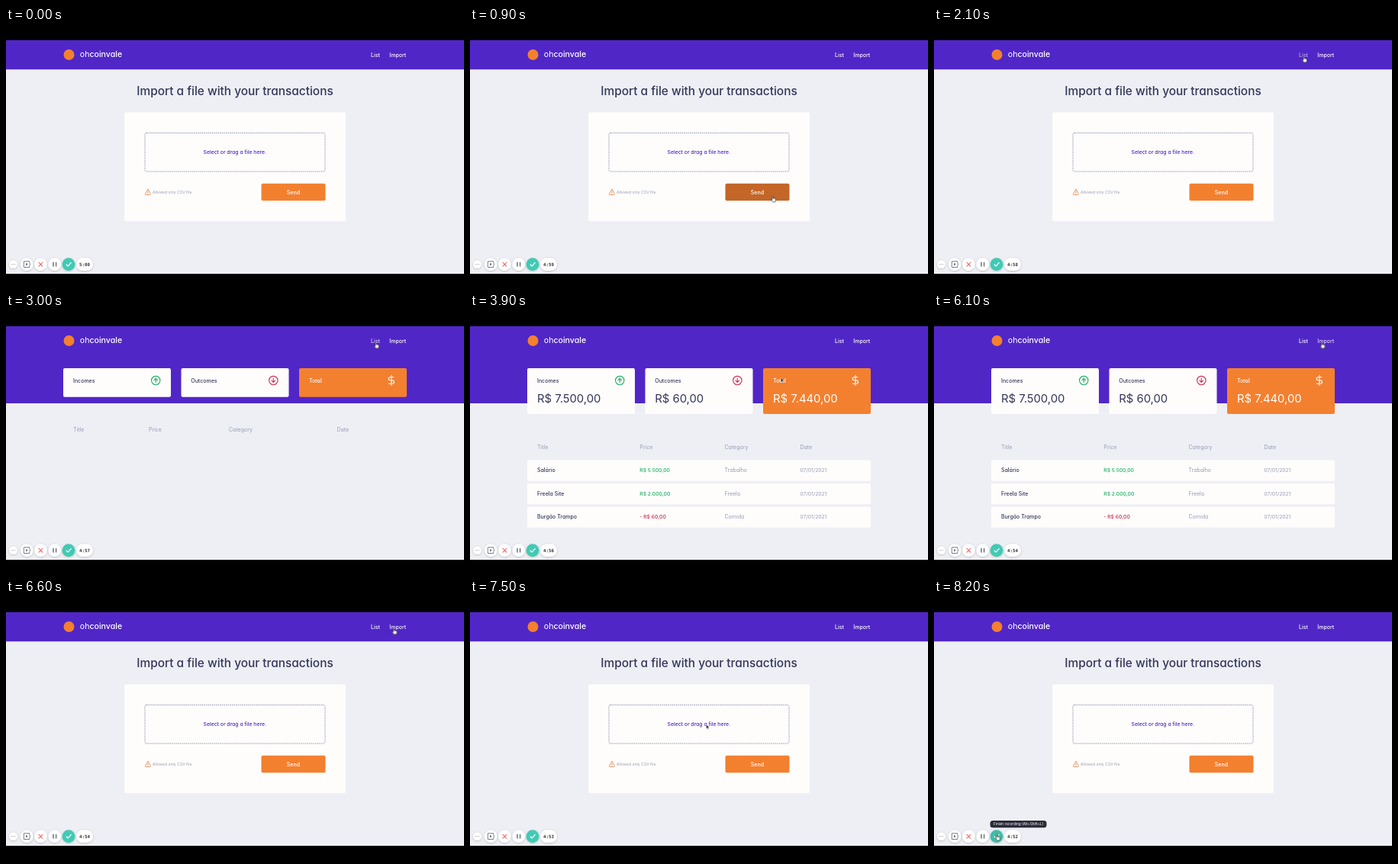
Animation of 600 by 338 pixels, one loop 8.4 s. Source, as an HTML page:

```html
<!DOCTYPE html>
<html lang="en">
<head>
<meta charset="utf-8">
<title>Import transactions</title>
<style>
html, body { margin: 0; width: 100%; height: 100%; overflow: hidden; background: #000; }
svg { display: block; width: 100vw; height: 100vh; }
text {
  font: 500 7px Inter, "Open Sans", sans-serif;
  font-feature-settings: "cv11";
  fill: #33365a;
  white-space: pre;
}
.mid { text-anchor: middle; }
.light { fill: #fff; }
.muted, .muted text { fill: #969cb3; font-weight: 400; }
.price { font-size: 6.75px; }
.date { font-size: 6.7px; }
.gain { fill: #1fb566; }
.loss { fill: #d0304f; }
.amount { font-size: 14.8px; font-weight: 400; }
.line { fill: none; stroke-linecap: round; stroke-linejoin: round; }
.card { fill: #fffdfc; }
.accent { fill: #f3802f; }

/* one shared 8.4 s loop */
.a { animation: 8.4s linear infinite; }
.step { animation-timing-function: step-end; }
#form { animation-name: form; }
#list { animation-name: list; }
#empty { animation-name: empty; }
#full { animation-name: full; }
#send { animation-name: send; }
#navList { animation-name: nav-list; }
#navImport { animation-name: nav-import; }
#done { animation-name: done; }
#tip { animation-name: tip; }
#cursor { animation-name: move; animation-timing-function: ease-in-out; }
#arrow { animation-name: arrow; }
#hand { animation-name: hand; }

@keyframes form { 0%, 78.3% { opacity: 1 } 34.3% { opacity: 0 } 100% { opacity: 1 } }
@keyframes list { 0%, 78.3% { opacity: 0 } 34.3% { opacity: 1 } 100% { opacity: 0 } }
@keyframes empty { 0% { opacity: 1 } 39.3%, 100% { opacity: 0 } }
@keyframes full { 0% { opacity: 0 } 39.3%, 100% { opacity: 1 } }
@keyframes send {
  0%, 8.2%, 17.5%, 100% { fill: #f3802f }
  10.2%, 15.2% { fill: #c36628 }
}
@keyframes nav-list {
  0%, 22.6%, 34.3%, 44%, 100% { opacity: 1 }
  25%, 34.25%, 37%, 42% { opacity: .6 }
}
@keyframes nav-import {
  0%, 71.5%, 78.3%, 85.5%, 100% { opacity: 1 }
  73.5%, 78.25%, 80.5%, 83.5% { opacity: .6 }
}
@keyframes done { 0% { fill: #3fcab4 } 95.1%, 100% { fill: #42bba8 } }
@keyframes tip { 0% { opacity: 0 } 95.1%, 100% { opacity: 1 } }
@keyframes move {
  0%, 4.5% { transform: translate(430px, 318px) }
  9.5%, 14.9% { transform: translate(396px, 220.5px) }
  23.2%, 41.7% { transform: translate(484px, 37.5px) }
  51.2%, 54.5% { transform: translate(330px, 130px) }
  62.5%, 64.9% { transform: translate(287px, 161.5px) }
  72%, 83.3% { transform: translate(507.5px, 37.5px) }
  95.8%, 100% { transform: translate(82px, 307.5px) }
}
@keyframes arrow {
  0%, 8.2%, 22.6%, 43.5%, 71.2%, 85%, 95.1%, 100% { opacity: 0 }
  4.5%, 16%, 43.6%, 85.1% { opacity: 1 }
}
@keyframes hand {
  0%, 16%, 43.6%, 85.1% { opacity: 0 }
  8.2%, 22.6%, 71.2%, 95.1%, 100% { opacity: 1 }
}
</style>
</head>
<body>
<svg viewBox="0 0 600 338" preserveAspectRatio="none">
  <defs>
    <filter id="soft" x="-30%" y="-30%" width="160%" height="170%">
      <feDropShadow dx="0" dy=".6" stdDeviation="1.1" flood-opacity=".28"/>
    </filter>
  </defs>

  <rect width="600" height="338"/>
  <rect y="16" width="600" height="306" fill="#eeeff4"/>
  <rect y="16" width="600" height="38.3" fill="#5126c7"/>

  <g id="form" class="a step">
    <text class="mid" x="300" y="87.6" style="font-size:15.4px">Import a file with your transactions</text>
    <rect class="card" x="155" y="110.5" width="290" height="142.5" rx="2"/>
    <rect x="182" y="137.5" width="236" height="50.5" rx="2" fill="none" stroke="#8b91ac" stroke-width=".9" stroke-dasharray="1.6 1"/>
    <text class="mid" x="299.8" y="165.1" style="font-size:6.85px;fill:#5126c7">Select or drag a file here.</text>
    <path class="line" d="M185.9 211.3 182.3 217.4Q182 218.5 183 218.5H188.6Q189.7 218.5 189.3 217.4ZM185.8 213.8V215.8M185.8 217V217.1" stroke="#e8834a" stroke-width=".8"/>
    <text class="muted" x="192" y="217" style="font-size:5.1px">Allowed only CSV file</text>
    <rect id="send" class="a accent" x="334.5" y="203.7" width="84" height="22.6" rx="2"/>
    <text class="mid light" x="376.4" y="217.5">Send</text>
  </g>

  <g id="list" class="a step">
    <rect y="54" width="600" height="63" fill="#5126c7"/>
    <g id="empty" class="a step">
      <g id="shortCards"></g>
      <g class="muted">
        <text x="88" y="154.4">Title</text>
        <text x="187" y="154.4">Price</text>
        <text x="292" y="154.4">Category</text>
        <text x="433.5" y="154.4">Date</text>
      </g>
    </g>
    <g id="full" class="a step">
      <g id="tallCards"></g>
      <g class="muted">
        <text x="88" y="176.9">Title</text>
        <text x="222.3" y="176.9">Price</text>
        <text x="333.5" y="176.9">Category</text>
        <text x="432.5" y="176.9">Date</text>
      </g>
      <text class="amount" x="88" y="116">R$ 7.500,00</text>
      <text class="amount" x="242.3" y="116">R$ 60,00</text>
      <text class="amount light" x="397" y="116">R$ 7.440,00</text>
      <g id="rows"></g>
    </g>
    <text x="88" y="89.5">Incomes</text>
    <text x="242.3" y="89.5">Outcomes</text>
    <text class="light" x="397" y="89.5">Total</text>
    <g class="line" stroke-width="1.15">
      <g stroke="#1fb566">
        <circle cx="196.2" cy="87" r="5.7"/>
        <path d="M196.2 89.5V84.5M193.9 86.8 196.2 84.5 198.5 86.8"/>
      </g>
      <g stroke="#dc2f55">
        <circle cx="350.3" cy="87" r="5.7"/>
        <path d="M350.3 84.5V89.5M348 87.2 350.3 89.5 352.6 87.2"/>
      </g>
      <path transform="translate(497.7 79.8) scale(.6)" stroke="#fff" stroke-width="1.8" d="M12 1v22M17 5H9.5a3.5 3.5 0 0 0 0 7h5a3.5 3.5 0 0 1 0 7H6"/>
    </g>
  </g>

  <circle cx="82.5" cy="35" r="7" class="accent"/>
  <text class="light" x="96.8" y="38" style="font-size:10.6px"><tspan font-weight="400" style="font-weight:400">oh</tspan>coinvale</text>
  <text id="navList" class="a light" x="478" y="37.7">List</text>
  <text id="navImport" class="a light" x="502.3" y="37.7">Import</text>

  <g filter="url(#soft)" fill="#fff">
    <circle cx="9.5" cy="309.6" r="5.4"/>
    <circle cx="27.2" cy="309.6" r="8.4"/>
    <circle cx="45.4" cy="309.6" r="8.4"/>
    <circle cx="63.8" cy="309.6" r="8.4"/>
    <circle id="done" class="a step" cx="82" cy="309.6" r="8.4" fill="#3fcab4"/>
    <rect x="92" y="301.2" width="22" height="16.8" rx="8.4"/>
  </g>
  <g class="line">
    <path d="M7.5 309.6h.01M9.5 309.6h.01M11.5 309.6h.01" stroke="#888" stroke-width="1"/>
    <path d="M30.8 307.5V305.7H23.4V313.5H30.8V311.7M31.3 308.5V310.7" stroke="#6f7380" stroke-width=".9"/>
    <path d="M26 307.8V311.4L28.8 309.6Z" fill="#6f7380"/>
    <path d="M42.9 307.1 47.9 312.1M47.9 307.1 42.9 312.1" stroke="#ec6a6a" stroke-width="1.1"/>
    <path d="M62 306.8V312.4M65.6 306.8V312.4" stroke="#6f7380" stroke-width="1.5" stroke-linecap="butt"/>
    <path d="M79 309.9 81.1 312 85.2 307.5" stroke="#fff" stroke-width="1.2"/>
  </g>
  <text id="clock" class="mid" x="103" y="311.7" style="font:700 5.8px 'DejaVu Sans Mono',monospace;fill:#333">5:00</text>

  <g id="tip" class="a step">
    <rect x="73.5" y="289" width="74" height="9.2" rx="3.5" fill="#2b2c39"/>
    <text class="mid light" x="110.6" y="295.3" style="font-size:4.7px;font-weight:400">Finish recording (Alt+Shift+L)</text>
  </g>

  <g id="cursor" class="a" stroke-linejoin="round">
    <path id="arrow" class="a step" d="M0 0V5.6L1.3 4.4 2.2 6.4 3.2 6 2.3 4.1H4Z" fill="#111" stroke="#fff" stroke-width=".5"/>
    <path id="hand" class="a step" d="M0 .6Q.7-.3 1.3.6V2.8Q2-.0 2.5 2.9 3.2 2.3 3.6 3.2 4.5 2.8 4.6 3.8V5.3L3.9 7.4H.6L-1.7 4.4Q-1.6 3.4-.7 3.9L0 4.6Z" fill="#fff" stroke="#111" stroke-width=".6"/>
  </g>
</svg>
<script>
const LOOP = 8400;
const $ = id => document.getElementById(id);

const cards = height => [75, 229.5, 384].map((x, i) =>
  `<rect class="${i < 2 ? 'card' : 'accent'}" x="${x}" y="71" width="141" height="${height}" rx="2"/>`).join('');
$('shortCards').innerHTML = cards(37.8);
$('tallCards').innerHTML = cards(60);

const items = [
  ['Salário', 'R$ 5.500,00', 'Trabalho'],
  ['Freela Site', 'R$ 2.000,00', 'Freela'],
  ['Burgão Trampo', '- R$ 60,00', 'Comida']
];
$('rows').innerHTML = items.map(([title, price, category], i) => {
  const y = 191.4 + i * 30.5, base = y + 15.9;
  const tone = price[0] === '-' ? 'loss' : 'gain';
  return `<rect class="card" x="75" y="${y}" width="450" height="27.3" rx="2"/>
    <text x="88" y="${base}">${title}</text>
    <text class="price ${tone}" x="222.3" y="${base}">${price}</text>
    <text class="muted" x="333.5" y="${base}">${category}</text>
    <text class="muted date" x="432.5" y="${base}">07/01/2021</text>`;
}).join('');

// recording countdown, one tick per second
function tick() {
  const t = performance.now() % LOOP;
  const left = 300 - Math.floor((t + 140) / 1000);
  const label = Math.floor(left / 60) + ':' + String(left % 60).padStart(2, '0');
  if ($('clock').textContent !== label) $('clock').textContent = label;
  requestAnimationFrame(tick);
}
tick();
</script>
</body>
</html>
```
